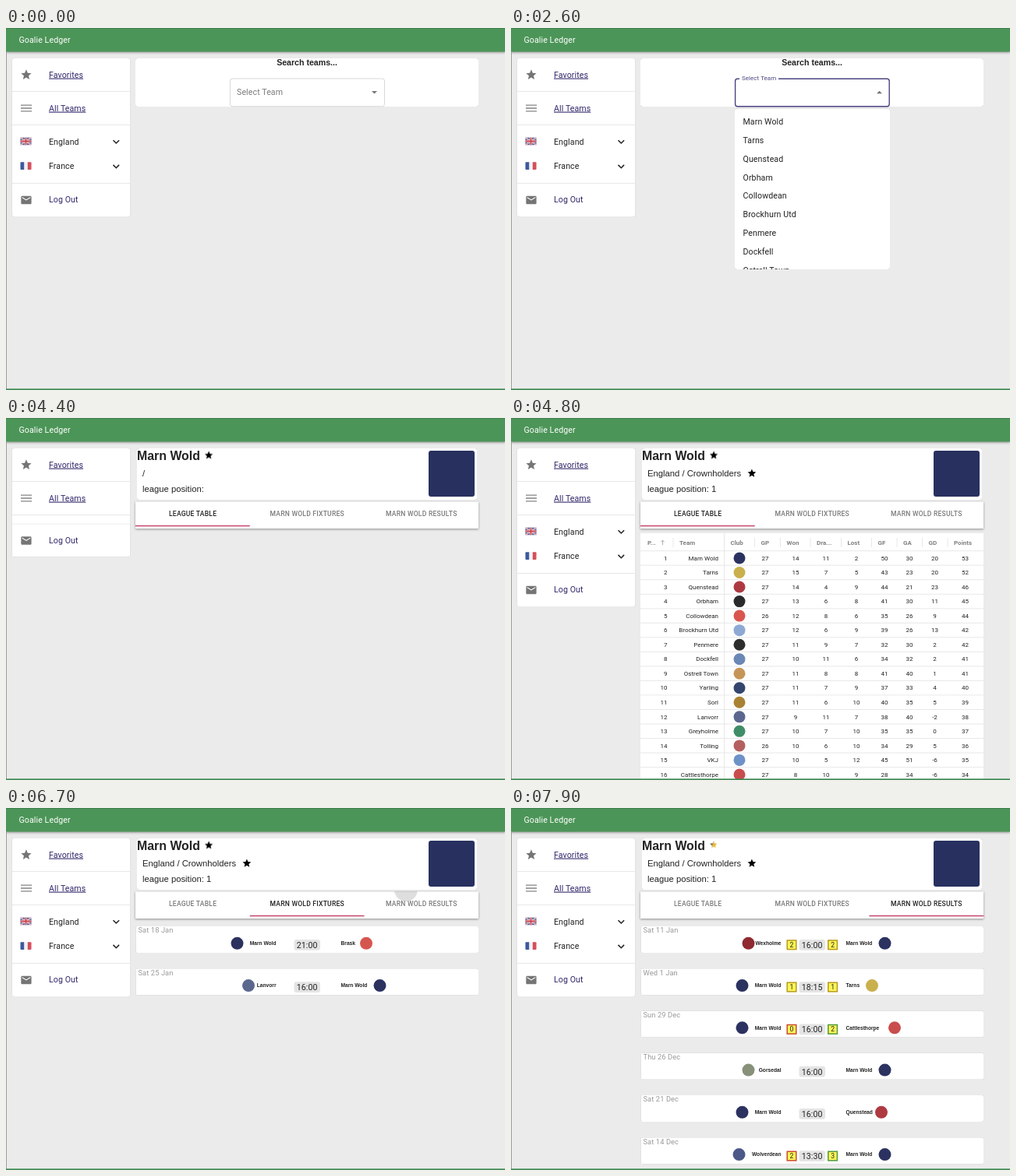
Animation of 640x465 px, one loop 8000 ms. Source, as an HTML page:

```html
<!DOCTYPE html>
<html lang="en">
<head>
<meta charset="utf-8">
<title>Goalie Ledger</title>
<style>
html, body { margin: 0; width: 100%; height: 100%; overflow: hidden; background: #ebebeb; }
svg { display: block; width: 640px; height: 465px; }
text { font: 10.6px Roboto, sans-serif; letter-spacing: .1px; fill: #222; }
.arial, .arial text { font-family: "Liberation Sans", Arial, sans-serif; letter-spacing: 0; }
.card { fill: #fff; filter: drop-shadow(0 .7px .7px rgba(0,0,0,.32)); }
.bar { filter: drop-shadow(0 1.2px 1.6px rgba(0,0,0,.4)); }
.rule { stroke: #e2e2e2; stroke-width: .8; }
.icon { fill: #757575; }
.link { fill: #30286a; }
.under { text-decoration: underline; }
.tab { font-size: 8.55px; font-weight: 500; letter-spacing: .24px; text-anchor: middle; }
.end { text-anchor: end; }
.mid { text-anchor: middle; }
.cell { font-size: 8px; letter-spacing: 0; }
.head { font-size: 8px; font-weight: 700; letter-spacing: 0; fill: #808080; }
.date { font-size: 9.3px; fill: #999; }
.club { font: 700 6.65px "Liberation Sans", Arial, sans-serif; letter-spacing: 0; }
.score { font-size: 8.6px; text-anchor: middle; letter-spacing: 0; }

.a { animation: 8s step-end infinite; }
#search { animation-name: search; }
#hover { animation-name: hover; }
#idle { animation-name: idle; }
#focus { animation-name: focus; }
#list { animation-name: list; }
#shut { animation-name: shut; }
#pick { animation-name: pick; }
#label { animation: float 8s infinite, tint 8s step-end infinite; }
#panel { animation-name: panel; }
#lands, #details { animation-name: lands; }
#lower { animation-name: lower; }
#team { animation-name: team; }
#details { animation-name: details; }
#table { animation-name: table; }
#fixtures { animation-name: fixtures; }
#results { animation-name: results; }
#fav { animation-name: fav; }
#gold { animation-name: gold; }
#tab1 { animation-name: tab1; }
#tab2 { animation-name: tab2; }
#tab3 { animation-name: tab3; }
#line { animation: slide 8s infinite; }
.ripple { transform-box: fill-box; transform-origin: center; }
#rip1 { animation: grow1 8s infinite, fade1 8s linear infinite; }
#rip2 { animation: grow2 8s infinite, fade2 8s linear infinite; }

@keyframes search { 0% { opacity: 1 } 46.25%, to { opacity: 0 } }
@keyframes hover { 0% { opacity: 0 } 17.5% { opacity: 1 } 20%, to { opacity: 0 } }
@keyframes idle { 0% { opacity: 1 } 20%, to { opacity: 0 } }
@keyframes focus { 0% { opacity: 0 } 20% { opacity: 1 } 46.25%, to { opacity: 0 } }
@keyframes list { 0% { opacity: 0 } 20% { opacity: 1 } 40%, to { opacity: 0 } }
@keyframes shut { 0% { opacity: 0 } 40% { opacity: 1 } 46.25%, to { opacity: 0 } }
@keyframes pick { 0% { opacity: 0 } 35% { opacity: 1 } 40%, to { opacity: 0 } }
@keyframes float {
  0%, 20% { transform: translate(296px, 86.2px); animation-timing-function: cubic-bezier(0,0,.2,1) }
  22.5%, to { transform: translate(296px, 67px) scale(.75) }
}
@keyframes tint { 0% { fill: #7b7b7b } 20%, to { fill: #4a4580 } }
@keyframes panel { 0% { height: 203px } 46.25% { height: 139.5px } 57.5%, to { height: 203px } }
@keyframes lands { 0% { opacity: 1 } 46.25% { opacity: 0 } 57.5%, to { opacity: 1 } }
@keyframes lower { 0% { transform: none } 46.25% { transform: translateY(-63.5px) } 57.5%, to { transform: none } }
@keyframes team { 0% { opacity: 0 } 46.25%, to { opacity: 1 } }
@keyframes details { 0% { opacity: 0 } 57.5%, to { opacity: 1 } }
@keyframes table { 0% { opacity: 0 } 58.75% { opacity: 1 } 73.325%, to { opacity: 0 } }
@keyframes fixtures { 0% { opacity: 0 } 77.5% { opacity: 1 } 84.5%, to { opacity: 0 } }
@keyframes results { 0% { opacity: 0 } 87.5%, to { opacity: 1 } }
@keyframes fav { 0% { opacity: 1 } 97.5%, to { opacity: 0 } }
@keyframes gold { 0% { opacity: 0 } 97.5%, to { opacity: 1 } }
@keyframes tab1 { 0% { fill: #212121 } 73.325%, to { fill: #7a7a7a } }
@keyframes tab2 { 0% { fill: #7a7a7a } 73.325% { fill: #212121 } 84.5%, to { fill: #7a7a7a } }
@keyframes tab3 { 0% { fill: #7a7a7a } 84.5%, to { fill: #212121 } }
@keyframes slide {
  0%, 73.325% { transform: none; animation-timing-function: cubic-bezier(.4,0,.2,1) }
  77.075%, 84.5% { transform: translateX(146.7px); animation-timing-function: cubic-bezier(.4,0,.2,1) }
  88.25%, to { transform: translateX(293.4px) }
}
@keyframes grow1 {
  0%, 71.65% { transform: scale(0); animation-timing-function: cubic-bezier(.4,0,.2,1) }
  78.525%, to { transform: scale(1) }
}
@keyframes fade1 { 0%, 71.65% { opacity: .1 } 73.325% { opacity: .16 } 80.2%, to { opacity: 0 } }
@keyframes grow2 {
  0%, 82.31% { transform: scale(0); animation-timing-function: cubic-bezier(.4,0,.2,1) }
  89.185%, to { transform: scale(1) }
}
@keyframes fade2 { 0%, 82.31% { opacity: .09 } 84.5% { opacity: .15 } 91.375%, to { opacity: 0 } }
</style>
</head>
<body>
<svg viewBox="0 0 640 465">
  <defs>
    <path id="star" d="M12 17.27 18.18 21l-1.64-7.03L22 9.24l-7.19-.61L12 2 9.19 8.63 2 9.24l5.46 4.73L5.82 21z"/>
    <path id="chev" d="M137.5 144.2l3.8 3.8 3.8-3.8" fill="none" stroke="#222" stroke-width="1.5"/>
    <linearGradient id="mix" x2="1" y2=".4">
      <stop offset=".35" stop-color="#222"/><stop offset=".5" stop-color="#e6b83c"/>
    </linearGradient>
    <clipPath id="listClip"><rect x="287" y="103.5" width="199" height="206.5" rx="3"/></clipPath>
    <clipPath id="clip2"><rect x="312.7" y="107.5" width="146.7" height="31.8"/></clipPath>
    <clipPath id="clip3"><rect x="459.4" y="107.5" width="146.6" height="31.8"/></clipPath>
  </defs>

  <rect width="640" height="465" fill="#ebebeb"/>

  <g id="side">
    <rect id="panel" class="card a" x="7.5" y="39" width="152" height="203" rx="3"/>
    <path class="rule" d="M7.5 81.5h152M7.5 124.5h152"/>
    <use href="#star" class="icon" transform="translate(18 52) scale(.663)"/>
    <text class="link under" x="55" y="63.6">Favorites</text>
    <path d="M19 99.2h14M19 103h14M19 106.8h14" stroke="#858585" stroke-width="1.3"/>
    <text class="link under" x="55" y="106.6">All Teams</text>
    <g id="lands" class="a">
      <g transform="translate(18.5 140.7)">
        <rect width="14" height="9.6" rx="1" fill="#4a5a93"/>
        <path d="M0 0l14 9.6M14 0L0 9.6" stroke="#f0e6ea" stroke-width="1.8"/>
        <path d="M0 0l14 9.6M14 0L0 9.6" stroke="#c9505c" stroke-width=".6"/>
        <path d="M7 0v9.6M0 4.8h14" stroke="#f4eef0" stroke-width="3.2"/>
        <path d="M7 0v9.6M0 4.8h14" stroke="#c8434f" stroke-width="1.8"/>
      </g>
      <text x="55" y="149.6">England</text>
      <use href="#chev"/>
      <g transform="translate(18.5 172.3)">
        <rect width="14" height="9.6" rx="1" fill="#f1f1f3"/>
        <path d="M1 0h3.7v9.6H1a1 1 0 0 1-1-1V1a1 1 0 0 1 1-1" fill="#3d5a9e"/>
        <path d="M9.3 0H13a1 1 0 0 1 1 1v7.6a1 1 0 0 1-1 1H9.3" fill="#d4505a"/>
      </g>
      <text x="55" y="181.2">France</text>
      <use href="#chev" y="31.7"/>
    </g>
    <g id="lower" class="a">
      <path class="rule" d="M7.5 199.5h152"/>
      <path class="icon" transform="translate(18 213) scale(.663)" d="M20 4H4c-1.1 0-2 .9-2 2v12c0 1.1.9 2 2 2h16c1.1 0 2-.9 2-2V6c0-1.1-.9-2-2-2zm0 4-8 5-8-5V6l8 5 8-5z"/>
      <text class="link" x="55" y="224">Log Out</text>
    </g>
  </g>

  <g id="search" class="a">
    <rect class="card" x="166" y="39" width="440" height="62" rx="3"/>
    <text class="arial mid" x="386" y="48.3" font-weight="700" style="font-weight:700">Search teams...</text>
    <g id="idle" class="a">
      <rect x="287.5" y="65" width="198" height="35.7" rx="3" fill="#fff" stroke="#cfcfcf" stroke-width=".8"/>
      <path d="M469 81h7l-3.5 3.5z" fill="#757575"/>
    </g>
    <rect id="hover" class="a" x="287.5" y="65" width="198" height="35.7" rx="3" fill="none" stroke="#333" stroke-width=".8"/>
    <g id="focus" class="a">
      <rect x="287.6" y="65.2" width="197.6" height="35.6" rx="3" fill="#fff" stroke="#4a4580" stroke-width="1.4"/>
      <path d="M293 65h50" stroke="#fff" stroke-width="3"/>
    </g>
    <g id="shut" class="a">
      <path d="M469 81h7l-3.5 3.5z" fill="#757575"/>
      <text x="296" y="86.2">Marn Wold</text>
    </g>
    <text id="label">Select Team</text>
    <g id="list" class="a">
      <path d="M469 84.3h7l-3.5-3.5z" fill="#757575"/>
      <rect class="card" x="287" y="103.5" width="199" height="206.5" rx="3"/>
      <rect id="pick" class="a" x="287" y="108.8" width="199" height="23.8" fill="#f0f0f0"/>
      <g id="options" clip-path="url(#listClip)"></g>
    </g>
  </g>

  <g id="team" class="a">
    <rect class="card" x="168" y="39" width="436" height="66" rx="3"/>
    <g class="arial">
      <text x="168" y="53.5" style="font-size:15.9px;font-weight:700">Marn Wold</text>
      <text x="175" y="95.4" style="font-size:11.25px">league position:</text>
    </g>
    <use id="fav" class="a" href="#star" transform="translate(253.8 41.4) scale(.52)"/>
    <use id="gold" class="a" href="#star" fill="url(#mix)" transform="translate(254.4 41.6) scale(.46)"/>
    <rect x="542" y="42" width="59" height="59" rx="3" fill="#27305f"/>
    <rect class="card bar" x="166" y="107.5" width="440" height="34.5"/>
    <g clip-path="url(#clip2)"><circle id="rip1" class="ripple" cx="356.5" cy="123" r="105"/></g>
    <g clip-path="url(#clip3)"><circle id="rip2" class="ripple" cx="513" cy="105.5" r="95"/></g>
    <text id="tab1" class="tab a" x="239.6" y="126.3">LEAGUE TABLE</text>
    <text id="tab2" class="tab a" x="386.2" y="126.3">MARN WOLD FIXTURES</text>
    <text id="tab3" class="tab a" x="532.8" y="126.3">MARN WOLD RESULTS</text>
    <rect id="line" x="166" y="137.8" width="146.7" height="1.5" fill="#c4476c"/>
  </g>
  <g id="details" class="a">
    <g class="arial">
      <text id="place" x="175" y="75.3" style="font-size:11.25px"> England / Crownholders</text>
      <text x="257" y="95.4" style="font-size:11.25px">1</text>
    </g>
    <use href="#star" transform="translate(302.4 64.4) scale(.54)"/>
  </g>
  <g id="lands2" class="arial"></g>

  <g id="table" class="a"></g>
  <g id="fixtures" class="a"></g>
  <g id="results" class="a"></g>

  <rect class="bar" width="640" height="30.5" fill="#4c9558"/>
  <rect width="640" height=".8" fill="#3f7c4b"/>
  <text x="16.5" y="18.9" style="fill:#fff">Goalie Ledger</text>
  <rect y="31" width=".8" height="433" fill="#8a8a8a"/>
  <rect y="463.3" width="640" height="1.7" fill="#3f8a52"/>
</svg>
<style>
#slash { animation-name: slash; }
@keyframes slash { 0% { opacity: 0 } 46.25% { opacity: 1 } 57.5%, to { opacity: 0 } }
</style>
<script>
const $ = id => document.getElementById(id);
const text = (x, y, cls, s) => `<text x="${x}" y="${y}" class="${cls}">${s}</text>`;
const crest = (x, y, size, color) =>
  `<circle cx="${x}" cy="${y}" r="${size / 2}" fill="${color}"/>`;

$('lands2').innerHTML = '<text id="slash" class="a" x="175" y="75.3" style="font-size:11.25px">/</text>';

// name, crest colour, won, drawn, goals for, goals against, games
const clubs = [
  ['Marn Wold', '#2b3260', 14, 11, 50, 30],
  ['Tarns', '#c9b04c', 15, 7, 43, 23],
  ['Quenstead', '#ad3a40', 14, 4, 44, 21],
  ['Orbham', '#2a2a2c', 13, 6, 41, 30],
  ['Collowdean', '#d9564f', 12, 8, 35, 26, 26],
  ['Brockhurn Utd', '#8ea9d4', 12, 6, 39, 26],
  ['Penmere', '#2d2d2d', 11, 9, 32, 30],
  ['Dockfell', '#6a87b5', 10, 11, 34, 32],
  ['Ostrell Town', '#c69558', 11, 8, 41, 40],
  ['Yarling', '#34456f', 11, 7, 37, 33],
  ['Sorl', '#a98334', 11, 6, 40, 35],
  ['Lanvorr', '#5c678f', 9, 11, 38, 40],
  ['Greyholme', '#3f8c68', 10, 7, 35, 35],
  ['Tolling', '#b4605f', 10, 6, 34, 29, 26],
  ['VKJ', '#6d92c8', 10, 5, 45, 51],
  ['Cattlesthorpe', '#c94d4d', 8, 10, 28, 34]
];
const colors = Object.fromEntries(clubs);
Object.assign(colors, { Brask: '#d5564f', Wexholme: '#8f2a30', Gorsedal: '#87917a', Wolverdean: '#4b5888' });

$('options').innerHTML = clubs.slice(0, 9)
  .map(([name], i) => text(297.5, 124.2 + 23.8 * i, '', name)).join('');

function table() {
  const heads = { 'P...': 175, Team: 216, Club: 281.5, GP: 320.5, Won: 353.5, 'Dra...': 392, Lost: 431.5,
    GF: 470.5, GA: 503, GD: 535.5, Points: 568 };
  const cols = [326, 365, 404, 443, 479, 511, 543.5, 582.5];
  let out = '<rect x="166" y="148" width="440" height="317" fill="#fff"/>';
  for (const [name, x] of Object.entries(heads)) {
    out += text(x, 163, 'head', name);
    if (x > 180) out += `<path class="rule" d="M${x - 8} 154v12"/>`;
  }
  out += '<path d="M194.5 163v-5.8M192.3 159.3l2.2-2.2 2.2 2.2" fill="none" stroke="#999" stroke-width=".8"/>';
  out += '<path class="rule" d="M166 170.7h440M273.5 148v317"/>';
  clubs.forEach(([name, color, won, drawn, gf, ga, gp = 27], i) => {
    const y = 180 + 18.53 * i, base = y + 2.7;
    const vals = [gp, won, drawn, gp - won - drawn, gf, ga, gf - ga, 3 * won + drawn];
    out += text(200.5, base, 'cell end', i + 1) + text(266, base, 'cell end', name);
    out += crest(293, y, 15, color);
    out += vals.map((v, k) => text(cols[k], base, 'cell mid', v)).join('');
    out += `<path class="rule" d="M166 ${y + 9.2}h440"/>`;
  });
  return out;
}

const edge = (a, b) => a > b ? '#4f9a3c' : a < b ? '#cc4a2c' : '#b79a1c';
const badge = (x, y, n, other) =>
  `<rect x="${x - 5.8}" y="${y - 5.8}" width="11.6" height="11.6" fill="#fbf556" stroke="${edge(n, other)}" stroke-width="1.5"/>`
  + text(x, y + 3, 'score', n);

// date, home, home crest x, time, away, away crest x, score
function match([date, home, hx, time, away, ax, score], i) {
  const y = 152 + 54.25 * i;
  let out = `<rect class="card" x="166.5" y="${y}" width="439.5" height="34" rx="2"/>`
    + text(169.5, y + 8.4, 'date', date)
    + text(346.5, y + 24, 'club end', home) + crest(hx, y + 21.8, 16, colors[home])
    + text(429.5, y + 24, 'club', away) + crest(ax, y + 21.8, 16, colors[away])
    + `<rect x="369.5" y="${y + 17}" width="33.5" height="13.8" rx="3" fill="#e4e4e4"/>`
    + text(386.2, y + 27.9, 'mid', time);
  if (score) out += badge(360, y + 23.8, score[0], score[1]) + badge(412.6, y + 23.8, score[1], score[0]);
  return out;
}

const us = 'Marn Wold';
$('table').innerHTML = table();
$('fixtures').innerHTML = [
  ['Sat 18 Jan', us, 296.5, '21:00', 'Brask', 462],
  ['Sat 25 Jan', 'Lanvorr', 311, '16:00', us, 479.5]
].map(match).join('');
$('results').innerHTML = [
  ['Sat 11 Jan', 'Wexholme', 304.5, '16:00', us, 479.5, [2, 2]],
  ['Wed 1 Jan', us, 296.5, '18:15', 'Tarns', 463, [1, 1]],
  ['Sun 29 Dec', us, 296.5, '16:00', 'Cattlesthorpe', 492, [0, 2]],
  ['Thu 26 Dec', 'Gorsedal', 304.5, '16:00', us, 479.5],
  ['Sat 21 Dec', us, 296.5, '16:00', 'Quenstead', 475],
  ['Sat 14 Dec', 'Wolverdean', 292.5, '13:30', us, 479.5, [2, 3]]
].map(match).join('');
</script>
</body>
</html>
```
